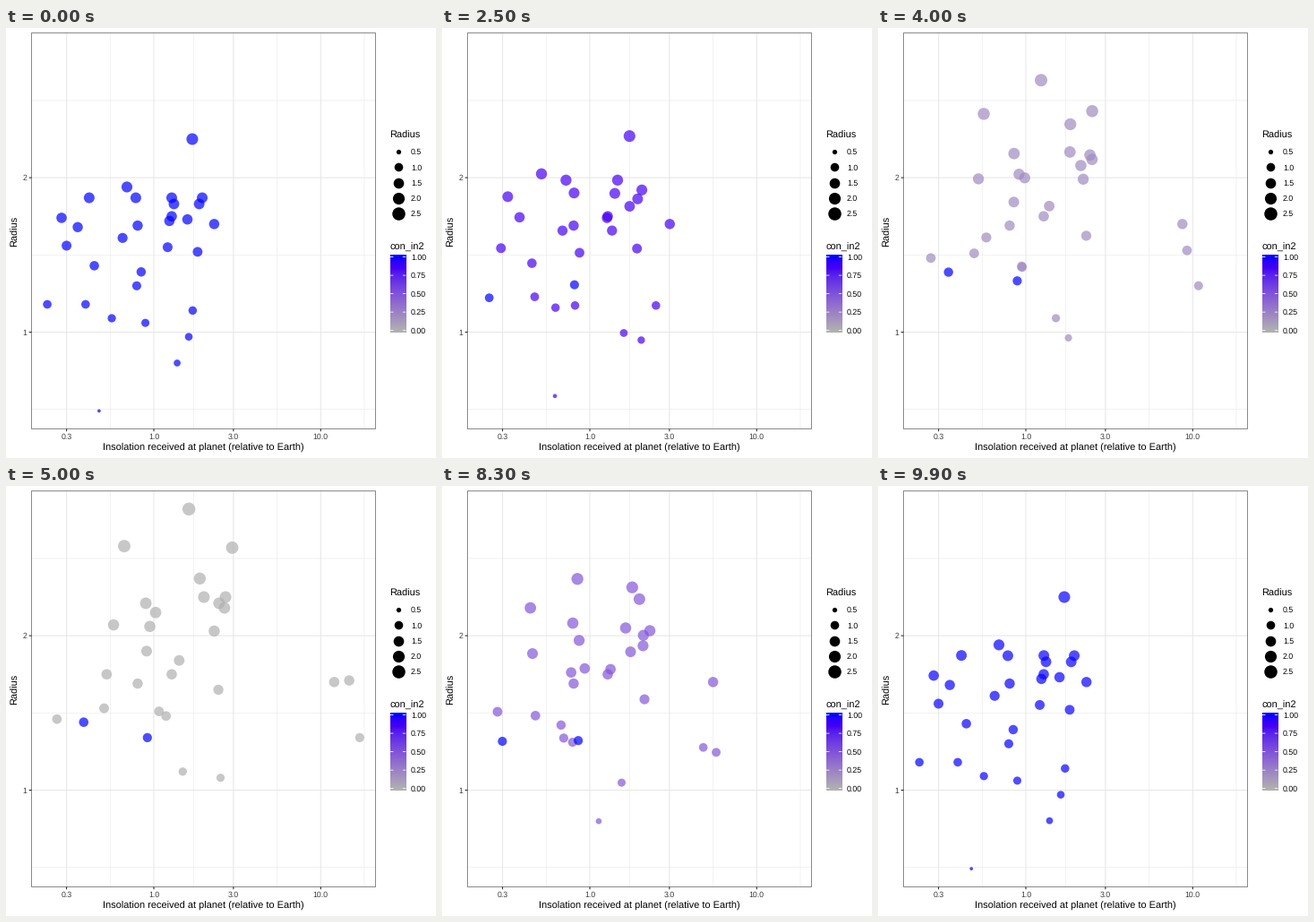
These frames come from a looping animation (480x480 px, 10000 ms). A matplotlib script:

```python
import numpy as np
import matplotlib.pyplot as plt
from matplotlib.animation import FuncAnimation
from matplotlib.patches import Rectangle

plt.rcParams["font.family"] = "Liberation Sans"
plt.rcParams["text.hinting"] = "no_hinting"

SIZE, DPI = 480, 72
LEFT, RIGHT, TOP, BOTTOM = 28.5, 412.5, 5.5, 447.5
X_ONE, DECADE = 165.0, 186.3      # pixel of insolation 1, pixels per decade
Y_ONE, UNIT = 339.5, 172.4        # pixel of radius 1, pixels per unit
R_MIN, R_MAX = 0.49, 2.82
LINE = 1.07
ALPHA = 0.7
GRID, TICK, INK = "0.904", "0.14", "0.23"

# Insolation, radius, revised radius and, where the star also turned out
# hotter or cooler, the factor on its light. The last two stay blue.
PLANETS = [
    (1.70, 2.25, 2.37), (0.69, 1.94, 2.21), (0.41, 1.87, 2.82, 1.74),
    (0.78, 1.87, 2.06), (1.28, 1.87, 2.57, 1.22), (1.32, 1.83, 2.25),
    (1.95, 1.87, 2.18), (1.87, 1.83, 2.03), (0.28, 1.74, 2.58, 1.08),
    (0.35, 1.68, 2.07, 1.08), (0.80, 1.69, 1.69), (1.24, 1.72, 1.84),
    (1.28, 1.75, 1.75), (1.59, 1.73, 2.25), (2.30, 1.70, 1.70, 5.24),
    (0.30, 1.56, 1.46), (0.65, 1.61, 1.90), (1.21, 1.55, 2.21),
    (1.83, 1.52, 1.65, 1.13), (0.44, 1.43, 1.53), (0.84, 1.39, 2.15, 0.51),
    (0.39, 1.18, 1.48, 1.93), (0.56, 1.09, 1.51), (0.89, 1.06, 1.75, 0.215),
    (1.71, 1.14, 1.34, 7.25), (1.62, 0.97, 1.12, 0.69),
    (1.38, 0.80, 1.71, 2.35), (0.47, 0.49, 1.08, 1.10),
    (0.79, 1.30, 1.34, 1.09), (0.23, 1.18, 1.44, 1.11),
]
STAY_BLUE = 2

TO_XYZ = np.array([[0.4124, 0.3576, 0.1805],
                   [0.2126, 0.7152, 0.0722],
                   [0.0193, 0.1192, 0.9505]])
WHITE = TO_XYZ.sum(axis=1)


def rgb_to_lab(rgb):
    rgb = np.asarray(rgb, float)
    lin = np.where(rgb > 0.04045, ((rgb + 0.055) / 1.055) ** 2.4, rgb / 12.92)
    v = TO_XYZ @ lin / WHITE
    fx, fy, fz = np.where(v > 0.008856, np.cbrt(v), 7.787 * v + 16 / 116)
    return np.array([116 * fy - 16, 500 * (fx - fy), 200 * (fy - fz)])


def lab_to_display(lab):
    """Lab to a display with gamma 1.8 and a slightly greener blue primary."""
    fy = (lab[0] + 16) / 116
    f = np.array([fy + lab[1] / 500, fy, fy - lab[2] / 200])
    xyz = np.where(f > 0.2069, f ** 3, (f - 16 / 116) / 7.787) * WHITE
    r, g, b = np.linalg.solve(TO_XYZ, xyz)
    g = (g - 0.019 * r - 0.033 * b) / 0.948
    return np.clip([r, g, b], 0, 1) ** (1 / 1.8)


BLUE = rgb_to_lab((0, 0, 1))
GREY = rgb_to_lab((0.745, 0.745, 0.745))


def shade(value):
    return lab_to_display(GREY + (BLUE - GREY) * value)


def diameter(radius):
    share = np.clip((np.asarray(radius) - R_MIN) / (R_MAX - R_MIN), 0, 1)
    size = 1 + 5 * np.sqrt(share)
    return 0.75 * (size * 2.845 + 0.945) + 0.95


def x_pos(insolation):
    return X_ONE + DECADE * np.log10(insolation)


def y_pos(radius):
    return Y_ONE - UNIT * (radius - 1)


fig = plt.figure(figsize=(SIZE / DPI, SIZE / DPI), dpi=DPI, facecolor="white")
ax = fig.add_axes([0, 0, 1, 1])


def line(xs, ys, color, width=LINE, z=1):
    ax.plot(xs, ys, color=color, lw=width, zorder=z, snap=False,
            solid_capstyle="butt")


def label(x, y, text, size=8.8, color="black", **kw):
    ax.text(x, y, text, fontsize=size, color=color, va="baseline", **kw)


def draw_panel():
    x_marks = x_pos(np.array([0.3, 1, 3, 10]))
    ends = np.append(x_marks, x_marks[-1] + x_marks[1] - x_marks[0])
    for x in (ends[1:] + ends[:-1]) / 2:
        line([x, x], [TOP, BOTTOM], GRID, LINE / 2)
    for r in (0.5, 1.5, 2.5):
        line([LEFT, RIGHT], [y_pos(r)] * 2, GRID, LINE / 2)
    for x, text in zip(x_marks, ("0.3", "1.0", "3.0", "10.0")):
        line([x, x], [TOP, BOTTOM], GRID)
        line([x, x], [BOTTOM, BOTTOM + 2.75], TICK)
        label(x, 459, text, color=INK, ha="center")
    for r in (1, 2):
        y = y_pos(r)
        line([LEFT, RIGHT], [y, y], GRID)
        line([LEFT - 2.75, LEFT], [y, y], TICK)
        label(23.6, y + 3.2, str(r), color=INK, ha="right")
    ax.add_patch(Rectangle((LEFT, TOP), RIGHT - LEFT, BOTTOM - TOP, fill=False,
                           ec=TICK, lw=LINE / 2, zorder=4, snap=False))
    label((LEFT + RIGHT) / 2, 472, "Insolation received at planet (relative to Earth)",
          11, ha="center")
    label(13.3, (TOP + BOTTOM) / 2, "Radius", 11, ha="center", rotation=90,
          rotation_mode="anchor")


def draw_legends():
    x, width = 429.0, 17.28
    label(x - 0.6, 123, "Radius", 11)
    for i, r in enumerate((0.5, 1.0, 1.5, 2.0, 2.5)):
        y = 138 + width * i
        ax.scatter([x + width / 2], [y], s=(diameter(r) + 0.8) ** 2,
                   c="black", lw=0, antialiased=False)
        label(452, y + 3.2, f"{r:.1f}")

    label(x - 0.3, 247.8, "con_in2", 11)
    top, height, bins = 253.4, 86.4, 20
    ramp = np.array([[shade(v)] for v in np.linspace(1, 0, bins)])
    ax.imshow(ramp, extent=(x, x + width, top + height, top), aspect="auto",
              interpolation="bilinear", zorder=1)
    pad, notch = height / bins / 2, width / 5
    for v in (1, 0.75, 0.5, 0.25, 0):
        y = top + pad + (height - 2 * pad) * (1 - v)
        line([x, x + notch], [y, y], "white", 0.8, z=2)
        line([x + width - notch, x + width], [y, y], "white", 0.8, z=2)
        label(452, y + 3.2, f"{v:.2f}")


def travel(flux, radius, new_radius, warming=1):
    """Both ends of a planet's path; its light grows with the radius squared."""
    new_flux = flux * (new_radius / radius) ** 2 * warming
    return ((x_pos(flux), y_pos(radius), diameter(radius)),
            (x_pos(new_flux), y_pos(new_radius), diameter(new_radius)))


def progress(frame):
    """Share of the way from start to end: hold, go, hold, return."""
    t = np.interp(frame, [0, 16, 50, 67, 100], [0, 0, 1, 1, 0])
    return (1 - np.cos(np.pi * t)) / 2


draw_panel()
draw_legends()
ax.set_xlim(0, SIZE)
ax.set_ylim(SIZE, 0)
ax.axis("off")

paths = np.array([travel(*planet) for planet in PLANETS])
start, end = paths[:, 0], paths[:, 1]
dots = ax.scatter(start[:, 0], start[:, 1], lw=0, zorder=3)


def update(frame):
    p = progress(frame)
    now = start + (end - start) * p
    dots.set_offsets(now[:, :2])
    dots.set_sizes(now[:, 2] ** 2)
    colors = np.full((len(PLANETS), 4), ALPHA)
    colors[:, :3] = shade(1 - p)
    colors[-STAY_BLUE:, :3] = shade(1)
    dots.set_facecolor(colors)
    return [dots]


anim = FuncAnimation(fig, update, frames=100, interval=100, repeat=True,
                     repeat_delay=0, blit=False)
plt.show()
```
